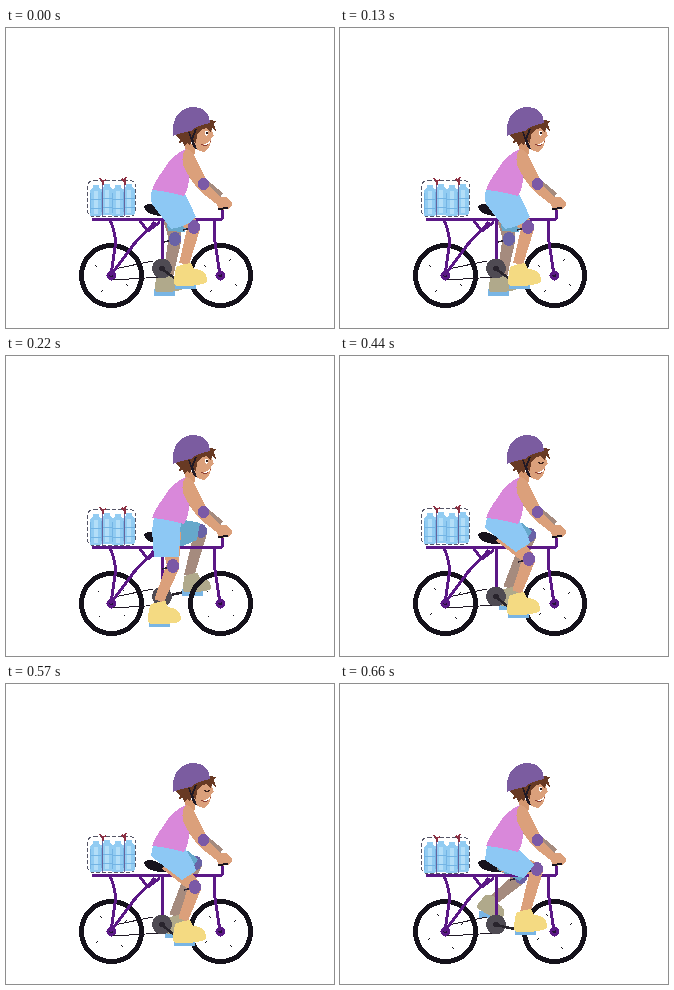
These frames come from a looping animation (328 px wide and 300 px high, 0.88 s). An HTML page:

```html
<!DOCTYPE html>
<html lang="en">
<head>
<meta charset="utf-8">
<title>Cyclist</title>
<style>
html, body { margin: 0; width: 100%; height: 100%; overflow: hidden; background: #fff }
svg { display: block; width: 328px; height: 300px }
</style>
</head>
<body>
<svg viewBox="0 0 328 300" fill="none" stroke-linejoin="round" shape-rendering="crispEdges">
  <defs>
    <g id="wheel">
      <circle r="30" stroke="#15121b" stroke-width="5"/>
      <circle r="5" fill="#5b1886"/><circle r="2" fill="#26103a"/>
    </g>
    <g id="bottle">
      <path d="M3 2h6v3q3 1 3 4v22q0 2-2 2H2q-2 0-2-2V9q0-3 3-4z" fill="#92ccf2"/>
      <path d="M5.500 8v23" stroke="#b3def8" stroke-width="4"/>
      <path d="M0 10v20M0 16h12M0 25h12" stroke="#73b4e4"/>
    </g>
    <path id="boot" d="M-10-7Q-4-10 5-11L8-5Q19-5 21 4Q22 9 17 10L5 12H-9Q-13 11-12 5Z"/>
  </defs>

  <path d="M138 179Q141 174 149 177L165 184Q164 189 156 188Q140 187 138 179Z" fill="#17131d"/>
  <g id="far"></g>

  <use href="#wheel" x="105.500" y="247.500"/>
  <use href="#wheel" x="214.500" y="247.500"/>
  <path id="specks" stroke="#15121b" stroke-dasharray="2 7"/>
  <path d="M108 241L147 233M107 252L156 249" stroke="#201925"/>
  <path d="M86 191H216V182M104 192Q111 208 109 219L105 247L128 216L149 194M134 193L142 203L154 194M156.500 191V241M208 192L209 214L214 247" stroke="#5b1886" stroke-width="3"/>

  <g id="load">
    <rect x="81.500" y="152.500" width="48" height="36" rx="6" stroke="#555566" stroke-dasharray="4 2"/>
    <use href="#bottle" x="84" y="155"/><use href="#bottle" x="95" y="154"/>
    <use href="#bottle" x="106" y="155"/><use href="#bottle" x="117" y="154"/>
    <path d="M96.500 153V188M118.500 153V188" stroke="#66649c"/>
    <path d="M94 150l2 3 4-1M97 152v5M116 151l2 2 2-4M119 152v5" stroke="#8d3043" stroke-width="1.500"/>
  </g>

  <path d="M180 145L190 149L203 158L215 168" stroke="#a58b7e" stroke-width="7"/>
  <g id="near"></g>

  <path d="M179 114L190 117L189 126L179 127Z" fill="#d5976f"/>
  <path d="M180 121Q167 126 158 141Q149 153 146 162Q160 163 178 168Q183 159 183 150L180 133Z" fill="#d988da"/>
  <path d="M180 121Q187 122 190 131L200 151L204 159L217 171L213 178L195 164Q183 151 177 137Q175 126 180 121Z" fill="#dba07b"/>
  <path d="M210 174Q213 167 220 169Q227 173 226 178Q222 183 213 181Z" fill="#dba07b"/>
  <path d="M212 181L222 180" stroke="#17131d" stroke-width="2"/>
  <ellipse cx="197.500" cy="156" rx="6" ry="6" fill="#7b59a6"/>

  <path d="M184 103L201 95Q207 98 206 103L208 108L205 110Q205 121 198 124Q190 123 186 115Z" fill="#dba07b"/>
  <path d="M169 107L184 101L204 92L210 93L208 96L210 103L206 100L205 104L200 100L195 102L191 107L190 115L186 112L184 117L181 115L178 118L177 114L173 115L174 111Z" fill="#683a24"/>
  <path d="M167 107C165 89 175 79 188 79C199 79 204 87 204 95Q192 97 185 103Q177 104 167 108Z" fill="#7b5ca0"/>
  <path d="M190 101L186 111L190 121M183 104L188 119" stroke="#201925" stroke-width="1.800"/>
  <path d="M195 116Q200 120 205 113" stroke="#8b3e36"/>
  <path d="M198 116Q202 117 204 113" stroke="#fff"/>
  <g id="open"><ellipse cx="200.500" cy="105" rx="2" ry="2.500" fill="#fff"/><circle cx="201" cy="105" r="1.300" fill="#2b1b1b"/></g>
  <path id="shut" d="M198 106Q201 109 204 106" stroke="#3a211b"/>
</svg>
<script>
const $ = id => document.getElementById(id);
const SKIN = '#dba07b', SHADE = '#a58b7e', PAD = '#7b59a6';

// each leg: knee x, y, ankle x, y, boot x, y, boot angle
const poses = [
  { near: [188, 199, 178, 236, 180, 246, 0], far: [169, 211, 162, 249, 159, 254, 0],
    shorts: 'M147 161L178 164Q185 178 190 189Q183 198 165 201Q156 189 146 176Q143 168 147 161Z',
    under: 'M160 190L182 194L179 204L162 203Z' },
  { near: [167, 210, 153, 245, 154, 256, 2], far: [195, 175, 183, 220, 187, 226, 0],
    shorts: 'M148 161L175 163L174 180L173 201L148 201Q147 188 146 174Z',
    under: 'M170 163L185 165L194 167L191 184L172 192Z' },
  { near: [189, 203, 177, 236, 179, 247, 0], far: [190, 179, 168, 232, 170, 240, 0],
    shorts: 'M147 161L178 163Q188 177 190 187L176 196Q161 185 145 172Z',
    under: 'M168 165L182 167L192 175L185 187Z' },
  { near: [197, 185, 185, 229, 186, 236, 0], far: [181, 193, 152, 217, 150, 220, 30],
    shorts: 'M147 161L178 164L194 181L184 194Q164 190 145 176Z',
    under: 'M155 170L186 190L180 197L158 186Z' }
];

function limb(x, y, u, v, a, b, fill) {
  const d = Math.hypot(u - x, v - y), nx = (y - v) / d, ny = (u - x) / d;
  return `<path d="M${x + nx * a} ${y + ny * a}L${u + nx * b} ${v + ny * b}L${u - nx * b} ${v - ny * b}L${x - nx * a} ${y - ny * a}Z" fill="${fill}"/>`;
}

function leg([kx, ky, ax, ay, bx, by, turn], skin, pad, boot, scale) {
  return `<rect x="${bx - 11}" y="${by + 8 * scale}" width="21" height="7" rx="1" fill="#79b5e4"/>` +
    limb(164, 177, kx, ky, 11, 6, skin) + limb(kx, ky, ax, ay, 6.5, 5, skin) +
    `<path d="M${kx - 11} ${ky + 3}L${kx} ${ky}" stroke="#28202e" stroke-width="1.5"/>` +
    `<ellipse cx="${kx}" cy="${ky}" rx="6" ry="7" fill="${pad}"/>` +
    `<use href="#boot" transform="translate(${bx} ${by}) rotate(${turn}) scale(${scale})" fill="${boot}"/>`;
}

function spokes(cx, i) {
  return [0, 1, 2, 3].map(k => {
    const a = k * 1.57 + .55 + i * .2, x = Math.cos(a), y = Math.sin(a);
    return `M${cx + x * 17} ${247.5 + y * 17}L${cx + x * 22} ${247.5 + y * 22}`;
  }).join('');
}

function pose(i) {
  const { near, far, shorts, under } = poses[i];
  const crank = (x, y) => `<path d="M156 241L${x} ${y}" stroke="#28242c" stroke-width="2.5"/>`;
  $('far').innerHTML = crank(far[4], far[5] + 8) +
    leg(far, SHADE, '#6962a6', '#b0a98b', .85) + `<path d="${under}" fill="#66a8cb"/>`;
  $('near').innerHTML = '<circle cx="156" cy="240.5" r="10" fill="#4f4b53"/>' +
    '<circle cx="156" cy="240.5" r="3" fill="#29242d"/>' +
    crank(near[4] - 2, near[5] + 11) + leg(near, SKIN, PAD, '#f4da82', 1) +
    `<path d="${shorts}" fill="#8dc8f4"/>`;
  $('specks').setAttribute('d', spokes(105.5, i) + spokes(214.5, i));
  $('load').setAttribute('transform', `translate(0 ${i % 2})`);
  $('open').style.display = i === 2 ? 'none' : '';
  $('shut').style.display = i === 2 ? '' : 'none';
}

let shown = -1;
function tick() {
  const i = Math.floor(performance.now() / 220) % 4;
  if (i !== shown) pose(shown = i);
  requestAnimationFrame(tick);
}
tick();
</script>
</body>
</html>
```
